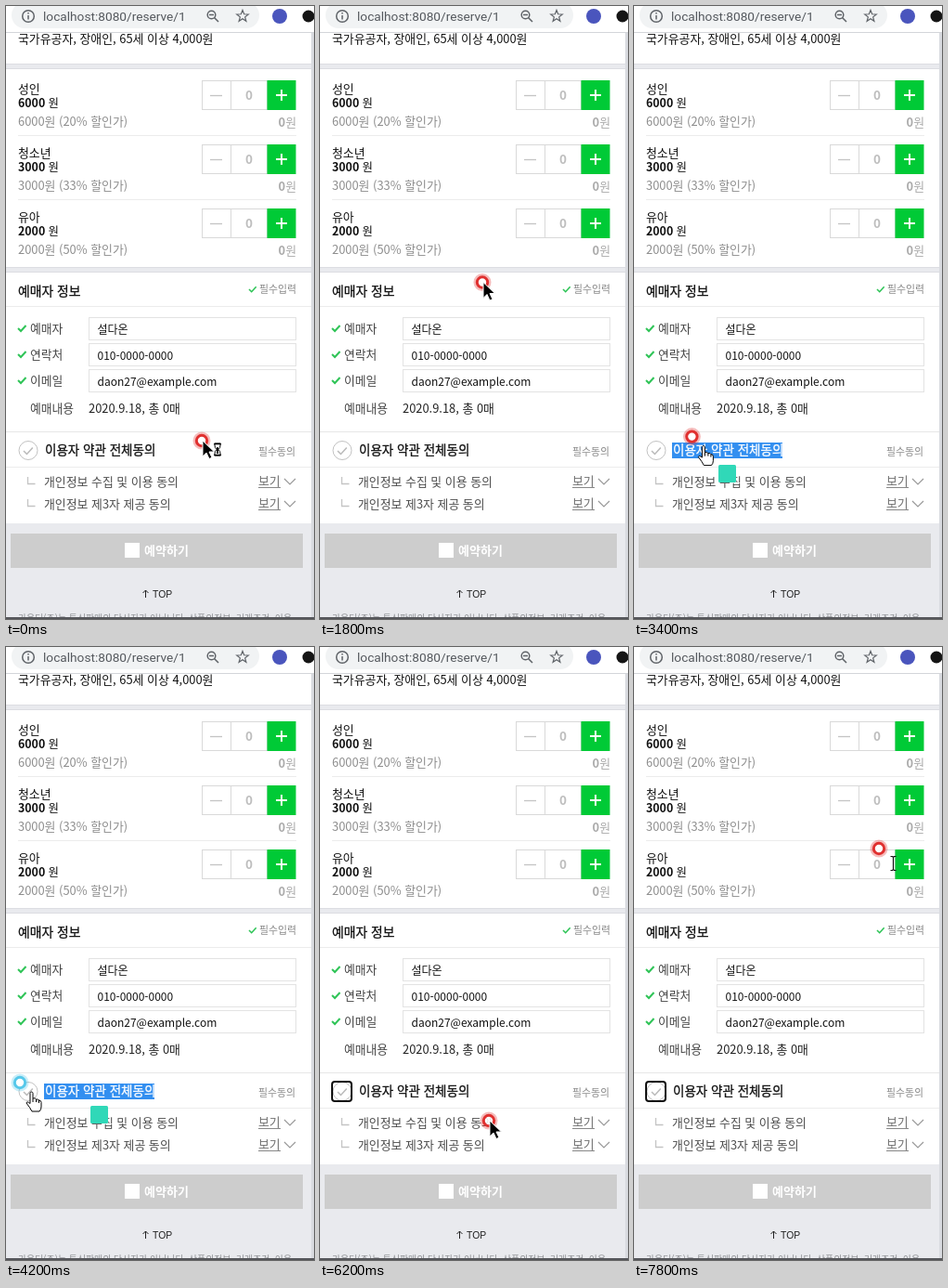
Recreate the animation shown at these times as an HTML page. Size 332 px wide and 660 px high, loop 8 s.

```html
<!DOCTYPE html>
<html lang="ko">
<head>
<meta charset="utf-8">
<title>예약</title>
<style>
  html, body { margin: 0; width: 100%; height: 100%; overflow: hidden; background: #fff; }
  svg { display: block; width: 100vw; height: 100vh; }
  text { font-family: "Noto Sans CJK KR", "Noto Sans CJK", sans-serif; white-space: pre; }
</style>
</head>
<body>
<svg id="stage" viewBox="0 0 332 660"></svg>
<script>
const stage = document.getElementById('stage');

function add(tag, attrs, parent = stage) {
  const el = document.createElementNS(stage.namespaceURI, tag);
  for (const key in attrs) el.setAttribute(key, attrs[key]);
  parent.append(el);
  return el;
}
const box = (x, y, width, height, fill, more) => add('rect', { x, y, width, height, fill, ...more });
const stroke = (d, color, width = 1, parent) =>
  add('path', { d, fill: 'none', stroke: color, 'stroke-width': width }, parent);
const rule = (x1, x2, y, color = '#ececec') => box(x1, y, x2 - x1, 1, color);
const frame = (x, y, w, h, color) => box(x + .5, y + .5, w - 1, h - 1, '#fff', { stroke: color });

// Text placed by its vertical centre.
function label(content, x, middle, size, fill = '#111', more = {}) {
  const el = add('text', { x, y: middle + size * .37, 'font-size': size, fill, ...more });
  el.textContent = content;
  return el;
}
const tick = (x, y, color, s = 1, width = 2) =>
  stroke(`M${x} ${y}l${3 * s} ${3 * s}l${5.5 * s} ${-6 * s}`, color, width);

const END = { 'text-anchor': 'end' };
const MID = { 'text-anchor': 'middle' };
const BOLD = { 'font-weight': 700 };
const MEDIUM = { stroke: '#111', 'stroke-width': .3 };
const GREEN = '#00ca36';
const PANEL = '#e9eaee';
const ICON = '#5f6368';

function pageTop() {
  label('국가유공자, 장애인, 65세 이상 4,000원', 13, 35, 12.9);
  box(0, 0, 332, 28, '#fff');
  box(6, -4, 267, 28, '#f1f3f4', { rx: 14 });
  rule(0, 332, 28, '#d3d5d9');
  add('circle', { cx: 24, cy: 11, r: 6.3, fill: 'none', stroke: ICON, 'stroke-width': 1.5 });
  stroke('M24 10v4.5M24 7v1.6', ICON, 1.5);
  label('localhost:8080/reserve/1', 40, 11, 13.7, '#55595e', { style: 'font-family:Roboto,sans-serif' });
  add('circle', { cx: 221.5, cy: 9.5, r: 4.3, fill: 'none', stroke: ICON, 'stroke-width': 1.5 });
  stroke('M219 9.5h5M224.5 12.500l4.500 4.500', ICON, 1.5);
  let star = '';
  for (let i = 0; i < 10; i++) {
    const r = i % 2 ? 2.8 : 6.6, a = i * Math.PI / 5;
    star += `${i ? 'L' : 'M'}${255 + r * Math.sin(a)} ${11 - r * Math.cos(a)}`;
  }
  stroke(star + 'z', ICON, 1.2);
  add('circle', { cx: 295, cy: 11, r: 8, fill: '#4a55bd' });
  add('circle', { cx: 326, cy: 11, r: 6.5, fill: '#151515' });
}

function band(y) {
  box(0, y, 329, 6, PANEL);
  rule(0, 329, y, '#dcdde2');
  rule(0, 329, y + 5, '#dcdde2');
}

function ticketRow(name, price, off, y) {
  label(name, 13, y - 7, 12.9);
  label(price, 13, y + 8, 12.4, '#111', BOLD);
  label('원', 45.5, y + 8, 12.4);
  label(`${price}원 (${off}% 할인가)`, 13, y + 28, 12.9, '#8d8d8d');
  frame(211, y - 16, 32, 32, '#d9d9d9');
  frame(242, y - 16, 40, 32, '#d9d9d9');
  box(281.5, y - 16, 31, 32, GREEN);
  stroke(`M220 ${y + .5}h13`, '#c4c4c4', 1.3);
  stroke(`M291 ${y}h12M297 ${y - 6}v12`, '#fff', 2);
  label('0', 262, y, 13.5, '#bdbdbd', { ...MID, ...BOLD });
  label('0', 301, y + 29, 12.9, '#aaa', { ...END, ...BOLD });
  label('원', 313, y + 29, 12.9, '#aaa', END);
}

function field(name, value, y) {
  tick(13, y, '#2fc457');
  label(name, 26, y, 12.8, '#444');
  frame(89, y - 12, 224, 25, '#e3e3e3');
  label(value, 98.5, y + 1.3, 12);
}

function term(name, y) {
  stroke(`M23.5 ${y - 5}v7.500h8`, '#c4c4c4', 1.3);
  label(name, 41, y, 12.9, '#4c4c4c');
  label('보기', 272, y - 1, 12.9, '#707070');
  rule(272, 296, y + 6, '#888');
  stroke(`M300 ${y - 3}l6 6l6 -6`, '#999', 1.2);
}

function page() {
  box(0, 0, 332, 660, '#fff');
  pageTop();
  band(62);
  ticketRow('성인', '6000', 20, 96);
  ticketRow('청소년', '3000', 33, 165);
  ticketRow('유아', '2000', 50, 234);
  rule(13, 313, 139);
  rule(13, 313, 208);
  band(281);

  label('예매자 정보', 13, 307, 13.8, '#111', MEDIUM);
  tick(262, 305, '#2fc457', .9, 1.6);
  label('필수입력', 313, 305, 10.9, '#888', END);
  rule(0, 329, 323);
  field('예매자', '설다온', 347);
  field('연락처', '010-0000-0000', 375);
  field('이메일', 'daon27@example.com', 403);
  label('예매내용', 26, 433, 12.8, '#444');
  label('2020.9.18, 총 0매', 89, 433, 12.9, '#222');

  rule(0, 329, 458, '#e6e6e6');
  add('circle', { cx: 24, cy: 478.5, r: 10, fill: '#fff', stroke: '#c2c2c2' });
  tick(19, 479, '#bbb', 1.15, 1.6);
  label('필수동의', 312, 480, 10.9, '#888', END);
  rule(0, 329, 496);
  term('개인정보 수집 및 이용 동의', 512);
  term('개인정보 제3자 제공 동의', 536);

  box(0, 557, 329, 103, PANEL);
  box(5, 568, 315, 37, '#cdcdcd');
  box(128, 578, 16, 16, '#fff');
  label('예약하기', 149, 586, 13, '#fff', BOLD);
  stroke('M150.500 637v-8M147.500 632l3 -3l3 3', '#222', 1);
  label('TOP', 158, 633, 10.4, '#222', { style: 'font-family:"Liberation Sans",Arial,sans-serif' });
  label('가온터(주)는 통신판매의 당사자가 아닙니다. 상품의정보, 거래조건, 이용', 13, 659, 9.9, '#8e9094');
  box(0, 658, 332, 2, '#55565a');
  box(329, 29, 3, 629, '#d9dbe0');
}
page();

const selection = box(41, 470, 119, 17, '#338ff0');
const agreement = label('이용자 약관 전체동의', 42, 478, 13.5, '#111', MEDIUM);
const focus = add('rect', { x: 13, y: 468, width: 21, height: 21, rx: 3, fill: 'none', stroke: '#111', 'stroke-width': 2 });
const popup = box(91, 494, 19, 19, '#30d8b8', { rx: 1.5 });

const pointer = add('g', {});
const halo = add('circle', { r: 8, fill: 'none', 'stroke-width': 3, opacity: .32 }, pointer);
const ring = add('circle', { r: 5.7, fill: '#fff', 'fill-opacity': .85, 'stroke-width': 3 }, pointer);
const shape = (d, transform, fill, line, parent = pointer) =>
  add('path', { d, transform, fill, stroke: line, 'stroke-linejoin': 'round' }, parent);
const arrow = shape('M0 0V17l4-4l3 6.500l3-1.300l-3-6.200h5.500z', 'translate(1,0)', '#000', '#fff');
const hourglass = add('g', {}, pointer);
shape('M14 4h6v2q0 3-2 4.500q2 1.500 2 4.500v2h-6v-2q0-3 2-4.500q-2-1.500-2-4.500z', 'translate(0,-1)', '#fff', '#000', hourglass);
stroke('M13 3.500h8M13 15.500h8', '#000', 1.5, hourglass);
stroke('M17 7v7', '#000', 2, hourglass);
const hand = shape('M-2 1.500C-2-.5 1-.5 1 1.500V7q2.500-1 3.500 1q2.500-.5 3 1q2.500 0 2.500 2.500V16q0 3-2 5H0q-2-4-6-9q.5-2.500 4 .5zM1 7v4M4.500 8v3M7.500 9v3', 'translate(13,10)', '#fff', '#000');
const beam = stroke('M12.500 8.500h2l1 1l1-1h2M15.500 9v14M12.500 23.500h2l1-1l1 1h2', '#111', 1.2, pointer);

// Time, ring x, ring y, cursor kind from then on.
const path = [
  [0, 211, 468, 'busy'], [200, 211, 468, 'busy'], [400, 225, 440, 'busy'],
  [600, 262, 330, 'busy'], [800, 292, 238, 'busy'], [1000, 304, 189, 'busy'],
  [1400, 304, 189, 'arrow'], [1600, 255, 205, 'arrow'], [2000, 95, 390, 'arrow'],
  [2200, 40, 425, 'hand'], [2400, 23, 413, 'hand'], [2600, 32, 440, 'hand'],
  [2800, 66, 463, 'hand'], [3800, 60, 464, 'hand'], [4000, 25, 468, 'hand'],
  [4200, 15, 469, 'hand'], [4800, 17, 470, 'hand'], [5000, 60, 480, 'arrow'],
  [5200, 150, 497, 'arrow'], [5400, 208, 503, 'arrow'], [5800, 208, 503, 'arrow'],
  [6200, 182, 510, 'arrow'], [6600, 265, 502, 'hand'], [6800, 180, 498, 'arrow'],
  [7000, 60, 480, 'hand'], [7200, 15, 469, 'hand'], [7400, 90, 400, 'arrow'],
  [7600, 200, 280, 'arrow'], [7800, 264, 217, 'beam'], [8000, 264, 217, 'beam']
];
const LOOP = 8000, STEP = 200;
const show = (el, on) => el.setAttribute('visibility', on ? 'visible' : 'hidden');
const within = (t, from, to) => t >= from && t < to;

function draw(now) {
  const t = Math.floor((now % LOOP) / STEP) * STEP;
  const i = path.findIndex((p, n) => within(t, p[0], path[n + 1][0]));
  const [t0, x0, y0, kind] = path[i], [t1, x1, y1] = path[i + 1];
  const k = (t - t0) / (t1 - t0);
  pointer.setAttribute('transform', `translate(${x0 + (x1 - x0) * k},${y0 + (y1 - y0) * k})`);

  const pressed = within(t, 3000, 3200) || within(t, 4200, 4400);
  const color = pressed ? '#56c8ea' : '#e0302f';
  ring.setAttribute('stroke', color);
  halo.setAttribute('stroke', color);
  show(arrow, kind === 'arrow' || kind === 'busy');
  show(hourglass, kind === 'busy');
  show(hand, kind === 'hand');
  show(beam, kind === 'beam');

  const selected = within(t, 3200, 4400);
  const ink = selected ? '#fff' : '#111';
  show(selection, selected);
  agreement.setAttribute('fill', ink);
  agreement.setAttribute('stroke', ink);
  show(popup, within(t, 3400, 6200));
  show(focus, t >= 4400);
}

const start = performance.now();
function play() {
  draw(performance.now() - start);
  requestAnimationFrame(play);
}
play();
</script>
</body>
</html>
```
